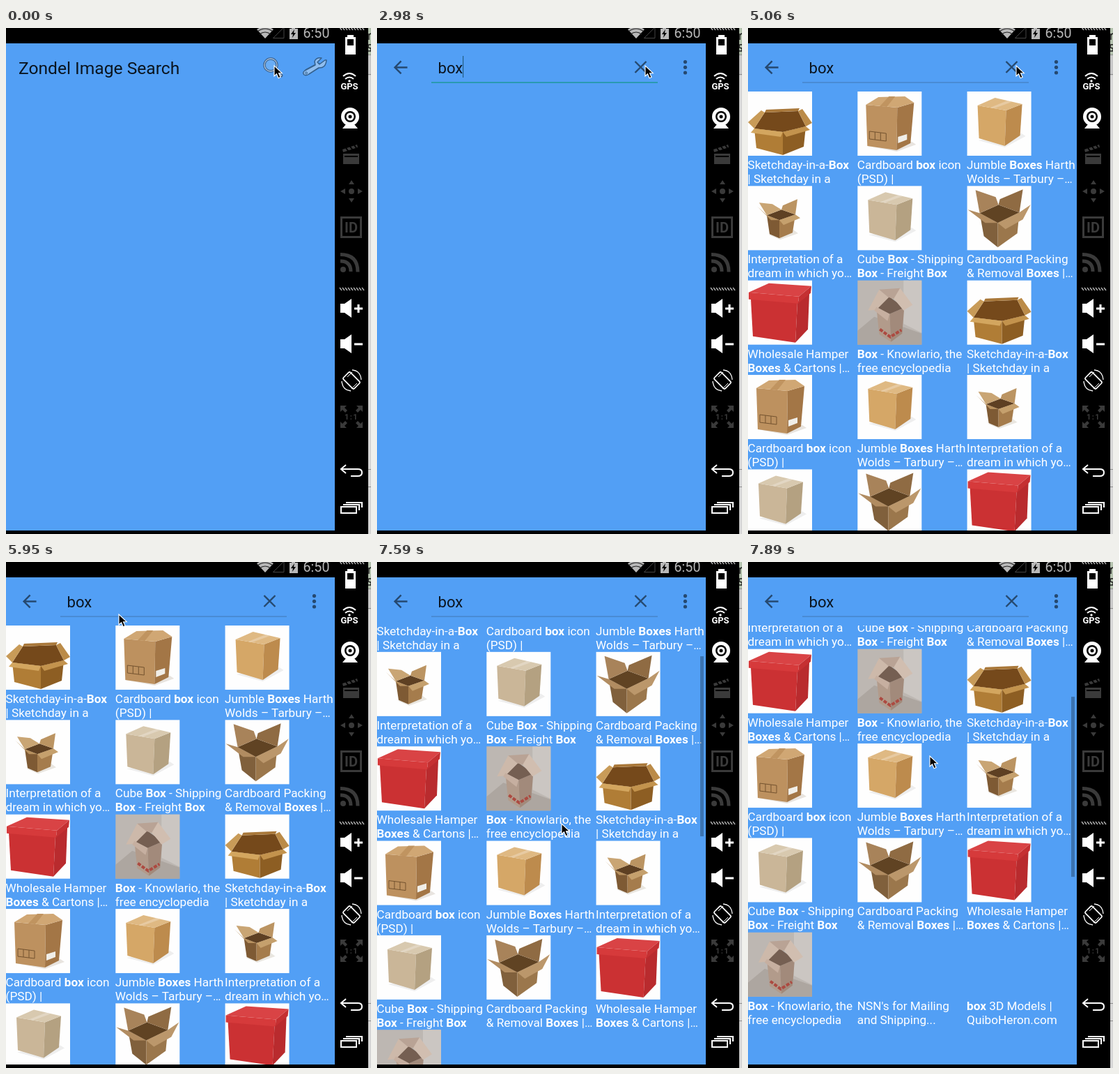
Write an HTML page that moves like this. It is 524x725 px and loops after 8 s.

```html
<!DOCTYPE html>
<html lang="en">
<head>
<meta charset="utf-8">
<title>Image search</title>
<style>
  html, body { margin: 0; width: 100%; height: 100%; overflow: hidden; background: #000; }
  svg { display: block; width: 524px; height: 725px; font-family: Roboto, sans-serif; }
  .ink { fill: rgba(0,0,0,.87); }
  .icon { fill: rgba(0,0,0,.54); }
  .label { fill: #fff; font-size: 17.2px; }
  .label tspan { font-weight: 700; }
  .dim { fill: #3a3a3a; }
  .lit { fill: #fff; }
  .line { fill: none; stroke: #fff; stroke-width: 2; }
</style>
</head>
<body>
<svg viewBox="0 0 524 725">
  <defs>
    <clipPath id="listArea"><rect y="91" width="472" height="629"/></clipPath>
    <path id="speaker" d="M480 -7h6l10-7v27l-10-7h-6z"/>
    <path id="hatch" d="M479 0l3 4m1-4l3 4m1-4l3 4m1-4l3 4m1-4l3 4m1-4l3 4m1-4l3 4m1-4l3 4m1-4l3 4" stroke="#aaa" stroke-width="1.5"/>
  </defs>

  <rect width="524" height="725"/>
  <rect y="22" width="472" height="698" fill="#529ff5"/>

  <!-- status bar -->
  <path d="M372 15L360 2Q372-6 384 2z" fill="#b8b8b8"/>
  <path d="M361 5q11-8 22 0M364 9q8-6 16 0" fill="none" stroke="#222" stroke-width="1.2"/>
  <path d="M383.5 14.500H399V-1z" fill="none" stroke="#444"/>
  <path d="M407 1h3v-2h5v2h4v15h-12z" fill="#b8b8b8"/>
  <path d="M414 2l-5 7h3l-1 5 5-7h-3z"/>
  <text x="426.500" y="14" font-size="19.700" fill="#b8b8b8">6:50</text>

  <!-- start bar -->
  <g id="home">
    <text class="ink" x="18" y="66" font-size="24.600">Zondel Image Search</text>
    <g fill="none" stroke-linecap="round" stroke-linejoin="round">
      <path d="M433 62L448 54" stroke="#34618f" stroke-width="8"/>
      <path d="M458 46l-8 6-3-3 6-6q-8-1-10 5l1 5-15 8q-4 3-1 6 3 2 7-1l14-9q10 1 11-11z" stroke="#34618f" stroke-width="1.500" fill="#8fbef0"/>
      <circle cx="431" cy="64.500" r="1.500" stroke="#34618f"/>
    </g>
  </g>
  <g id="lens" fill="none" stroke-linecap="round">
    <path d="M387 60l8 8" stroke="#3b5f87" stroke-width="5"/>
    <path d="M387 60l8 8" stroke="#b6c9de" stroke-width="2"/>
    <circle cx="380" cy="53" r="9" stroke="#3b5f87" stroke-width="3.400" fill="#69adf6"/>
    <circle cx="380" cy="53" r="9" stroke="#a9c4e2" stroke-width="1.300"/>
  </g>

  <!-- search bar -->
  <g id="search">
    <path class="icon" transform="translate(19 41.700) scale(1.229)" d="M20 11H7.830l5.590-5.590L12 4l-8 8 8 8 1.410-1.410L7.830 13H20z"/>
    <g class="icon"><circle cx="442.500" cy="48.600" r="2.600"/><circle cx="442.500" cy="56.300" r="2.600"/><circle cx="442.500" cy="64" r="2.600"/></g>
    <path id="clear" d="M370.500 48l16 16m0-16l-16 16" stroke="#26496f" stroke-width="2.400"/>
    <rect id="underline" x="78" y="77.500" width="325" height="1.200"/>
    <text id="query" class="ink" x="87.500" y="64.500" font-size="22.100"></text>
    <rect id="caret" y="40" width="1.200" height="31" fill="#235f86"/>
  </g>

  <g clip-path="url(#listArea)">
    <g id="list"></g>
    <rect id="scrollbar" x="464" width="5" height="258" fill="#000" opacity=".28"/>
  </g>

  <!-- window edge -->
  <rect x="520" width="4" height="725" fill="#d6d6d6"/>
  <rect x="520" width="4" height="38" fill="#b4c2ae"/>
  <rect x="520" y="38" width="4" height="30" fill="#c8c8c8"/>
  <path d="M520 38.500h4m-4 28h4m-4 566h4m-4 25h4" stroke="#8d8d8d"/>
  <path d="M521 8v9m0-6q1-3 3-3M524 24q-4-1-4 2t4 3v4h-4" fill="none" stroke="#222" stroke-width="1.500"/>

  <!-- emulator controls -->
  <use href="#hatch" y="-1"/>
  <path class="lit" fill-rule="evenodd" d="M490 10h9v3h3v25h-15V13h3zM490 16v9h9v-9z"/>
  <g class="line"><path d="M484 69q9-8 18 0M487 73q6-5 12 0"/><circle cx="493" cy="76" r=".7"/></g>
  <text class="lit" x="493" y="87.500" font-size="13" font-weight="700" text-anchor="middle">GPS</text>
  <path class="lit" d="M488 138h12l5 6h-22z"/>
  <circle class="lit" cx="494" cy="127" r="13"/><circle cx="494" cy="127" r="8"/>
  <circle class="lit" cx="494" cy="127" r="5.500"/><circle cx="494" cy="127" r="2.500"/>
  <g class="dim">
    <path d="M484 180h23v15h-23zM483 174l21-7 1 4-21 7z"/>
    <path d="M488 172l4 5m2-7l4 5m2-7l3 4M486 184h19" stroke="#000" stroke-width="2"/>
    <circle cx="496" cy="234" r="4"/>
    <path d="M496 218l4 6h-8zM496 250l4-6h-8zM480 234l7-4v8zM512 234l-7-4v8z"/>
    <rect x="481.500" y="271.500" width="28" height="28" fill="none" stroke="#3a3a3a" stroke-width="3"/>
    <text x="495.500" y="293" font-size="20" font-weight="700" text-anchor="middle">ID</text>
    <circle cx="484" cy="346" r="4"/>
    <path d="M480 334q15 0 15 15M480 324.500q25 0 25 25" fill="none" stroke="#3a3a3a" stroke-width="5"/>
    <path d="M480 541h9l-3 3 4 4-3 3-4-4-3 3zM512 541h-9l3 3-4 4 3 3 4-4 3 3zM480 573h9l-3-3 4-4-3-3-4 4-3-3zM512 573h-9l3-3-4-4 3-3 4 4 3-3z"/>
    <text x="496" y="561" font-size="11" font-weight="700" letter-spacing="1.500" text-anchor="middle">1:1</text>
  </g>
  <use href="#hatch" y="372"/>
  <use href="#speaker" class="lit" y="402"/><use href="#speaker" class="lit" y="453"/>
  <path class="line" d="M500 402h12m-6-6v12M500 453h12" style="stroke-width:3"/>
  <g class="line" style="stroke-width:1.700">
    <rect x="489" y="494" width="14" height="22" rx="2" transform="rotate(-45 496 505)"/>
    <path d="M490 500l7-7m-1 24l8-8" stroke-width="1"/>
    <path d="M497 490q12 1 13 14M495 520q-12-1-13-14" stroke-width="1.300"/>
    <path d="M488 626l-7 6 7 6M481 632h24q6 0 6 5t-6 5h-10" stroke-width="2"/>
    <path d="M481 686h22v9h-22zM484 683h23v8M488 680h23v7" stroke-width="2"/>
  </g>

  <path id="cursor" d="M0 0v15l3.500-3.200 2.600 6 3-1.300-2.600-5.800h4.800z" fill="#000" stroke="#fff" stroke-width="1.100"/>
</svg>

<script>
const LOOP = 8000, PITCH = 135.35, COLUMN = 157.3;
const $ = id => document.getElementById(id);
const face = (fill, points) => `<polygon fill="${fill}" points="${points}"/>`;
const tile = (fill = '#fefefe') => `<rect width="92" height="92" fill="${fill}"/>`;

// A closed carton seen from above: left, right and top faces.
const carton = (left, right, top) =>
  tile() + face('#eee', '16,70 54,80 84,64 78,60') +
  face(left, '15,20 56,27 54,78 17,67') +
  face(right, '56,27 79,18 76,63 54,78') +
  face(top, '15,20 40,9 79,18 56,27') +
  face('#ffffff40', '33,23 58,13 64,15 39,24');

const wideOpen = tile() +
  face('#b07d36', '9,53 50,58 50,91 12,81') +
  face('#8d5e23', '50,58 83,50 80,79 50,91') +
  face('#75491b', '24,30 72,28 83,50 50,58 9,53') +
  face('#c89b58', '24,30 9,53 0,44 19,27') +
  face('#bb8b48', '72,28 83,50 92,45 78,25') +
  face('#d3a65f', '9,53 50,58 47,65 4,59') +
  face('#c3934d', '50,58 83,50 89,55 55,65') +
  face('#a9783a', '24,30 26,26 74,24 72,28');

const tall = tile() + face('#e8e4df', '14,78 56,86 84,76 78,72') +
  face('#bd915f', '12,19 57,23 56,84 14,78') +
  face('#a37646', '57,23 81,16 76,74 56,84') +
  face('#d0a774', '12,19 30,8 68,7 81,16 57,23') +
  face('#c09460', '32,21 45,7 54,7 42,22') +
  face('#f0eee8', '58,65 71,61 71,69 58,74') +
  '<path d="M17 57l24 3v11l-24-3zm8 1v11m8-10v11" fill="none" stroke="#74532f"/>';

const small = tile() + face('#e9e6e0', '30,70 46,77 72,68 64,62') +
  face('#7e5a34', '27,42 45,49 45,75 31,69') +
  face('#a57c4c', '45,49 68,41 64,67 45,75') +
  face('#5e4023', '27,42 48,34 68,41 45,49') +
  face('#b8915f', '27,42 45,49 33,49 13,29') +
  face('#c9a574', '27,42 48,34 35,26 16,24') +
  face('#bb9462', '48,34 68,41 71,19 50,28') +
  face('#c5a06d', '45,49 68,41 75,46 51,56');

const large = tile() +
  face('#80603c', '18,39 44,53 44,88 24,72') +
  face('#9b774c', '44,53 75,38 72,68 44,88') +
  face('#604323', '18,39 45,27 75,38 44,53') +
  face('#a8835a', '18,39 45,27 41,16 12,6') +
  face('#8f6b43', '45,27 75,38 80,5 47,19') +
  face('#b18c61', '18,39 44,53 26,53 1,34') +
  face('#bb976b', '44,53 75,38 91,27 80,48 55,62');

const red = tile() +
  face('#cb3133', '4,26 71,31 68,89 7,80') +
  face('#b92b2e', '71,31 88,19 86,70 68,89') +
  face('#d94345', '1,17 30,4 91,8 73,23') +
  face('#d63a3b', '1,17 73,23 72,33 1,27') +
  face('#c53032', '73,23 91,8 90,18 72,33');

const corner = tile('#bdb7b2') +
  face('#ada6a0', '0,72 24,52 92,76 92,92 0,92') +
  face('#cbc6c2', '66,0 92,0 92,75 66,62') +
  face('#b29b8b', '27,38 46,48 48,88 31,77') +
  face('#a28a7b', '46,48 67,39 64,76 48,88') +
  face('#755f52', '27,38 45,23 67,39 46,48') +
  face('#cdb9aa', '31,13 45,24 27,42 15,43') +
  face('#b9a395', '31,13 61,11 54,27 44,24') +
  face('#d1beb0', '61,11 79,35 66,43 52,26') +
  face('#c6afa0', '27,38 46,48 43,58 24,43') +
  '<path d="M32 70l15 11 16-10" fill="none" stroke="#ac4a41" stroke-width="4" stroke-dasharray="5 2"/>';

// Asterisks mark bold words.
const results = [
  ['Sketchday-in-a-*Box*', '| Sketchday in a', wideOpen],
  ['Cardboard *box* icon', '(PSD) |', tall],
  ['Jumble *Boxes* Harth', 'Wolds – Tarbury –…', carton('#d5a767', '#bd8b4d', '#dfb983')],
  ['Interpretation of a', 'dream in which yo…', small],
  ['Cube *Box* - Shipping', '*Box* - Freight *Box*', carton('#cab698', '#b4a181', '#d8c9af')],
  ['Cardboard Packing', '&amp; Removal *Boxes* |…', large],
  ['Wholesale Hamper', '*Boxes* &amp; Cartons |…', red],
  ['*Box* - Knowlario, the', 'free encyclopedia', corner]
];
const items = [...results, ...results,
  ["NSN's for Mailing", 'and Shipping...', ''],
  ['*box* 3D Models |', 'QuiboHeron.com', '']];

const label = (text, y) =>
  `<text class="label" x="-.5" y="${y}">${text.replace(/\*(.+?)\*/g, '<tspan>$1</tspan>')}</text>`;

$('list').innerHTML = items.map(([first, second, picture], i) =>
  `<g transform="translate(${i % 3 * COLUMN} ${91 + Math.floor(i / 3) * PITCH})">
    <g class="picture">${picture}</g>${label(first, 111)}${label(second, 131)}</g>`).join('');
const cells = [...$('list').children];
const pictures = document.querySelectorAll('.picture');

// Time, pointer x, pointer y, list scroll; each pose holds until the next.
const poses = [
  [0, 385, 54, 0],
  [5510, 352, 115, 0], [5660, 275, 122, 0], [5810, 195, 95, 0], [5950, 162, 75, 0],
  [6250, 125, 69, 0], [6400, 52, 125, 0], [6550, 70, 260, 0], [6700, 140, 390, 0],
  [6850, 212, 480, 0], [7000, 255, 522, 0], [7150, 264, 530, 0], [7300, 265, 532, 0],
  [7440, 265, 467, 32], [7590, 265, 375, 97.5], [7740, 263, 318, 180], [7890, 261, 278, 237]
];
const carets = [[0, 0], [1500, 1], [2090, 0], [2540, 1], [3580, 0], [4030, 1], [4620, 0]];
const queries = [[0, ''], [2540, 'bo'], [2980, 'box']];
const caretX = { '': 87.5, bo: 111.5, box: 123 };

const at = (steps, t) => steps.findLast(step => step[0] <= t);
const show = (node, visible) => node.style.display = visible ? '' : 'none';

function draw(t) {
  const [, x, y, scroll] = at(poses, t);
  const query = at(queries, t)[1];
  const searching = t >= 1050, listed = t >= 4620, loaded = t >= 5060;

  show($('home'), !searching);
  show($('lens'), t < 1500);
  $('lens').style.opacity = t < 1050 ? 1 : t < 1200 ? .5 : .2;
  show($('search'), searching);
  show($('clear'), query);
  $('query').textContent = query;
  show($('caret'), at(carets, t)[1]);
  $('caret').setAttribute('x', caretX[query]);
  $('underline').setAttribute('fill', loaded ? '#447fbf' : '#109886');

  show($('list'), listed);
  cells.forEach((cell, i) => show(cell, loaded || i < results.length));
  pictures.forEach(picture => show(picture, loaded));
  $('list').setAttribute('transform', `translate(0 ${-scroll})`);
  show($('scrollbar'), scroll);
  $('scrollbar').setAttribute('y', 94.5 + scroll * .416);
  $('cursor').setAttribute('transform', `translate(${x} ${y})`);
}

const start = performance.now();
function frame() {
  draw((performance.now() - start) % LOOP);
  requestAnimationFrame(frame);
}
frame();
</script>
</body>
</html>
```
